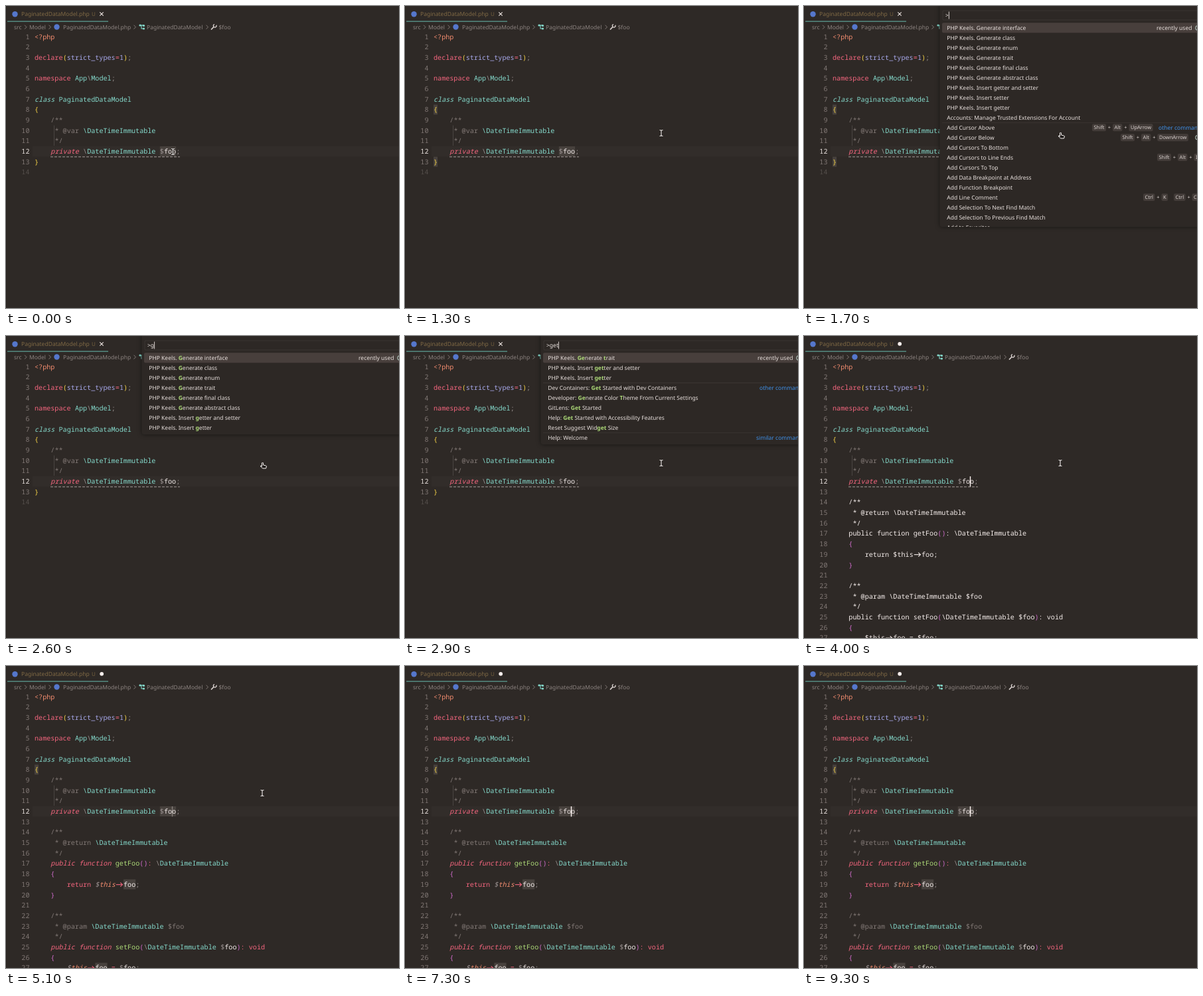
Write an HTML page with a canvas that moves like this. It is 592 px wide and 454 px high and loops after 9500 ms.

```html
<!DOCTYPE html>
<html lang="en">
<head>
<meta charset="utf-8">
<title>Generate getter and setter</title>
<style>
html, body { margin: 0; width: 100%; height: 100%; overflow: hidden; background: #2e2926; }
canvas { display: block; }
</style>
</head>
<body>
<canvas id="stage" width="592" height="454"></canvas>
<script>
const ctx = document.getElementById('stage').getContext('2d');
const W = 592, H = 454, LOOP = 9500, STEP = 100;
const UI = '"Noto Sans", "Open Sans", sans-serif';
const MONO = '"Noto Sans Mono", "DejaVu Sans Mono", monospace';
const CELL = 6.09, LEFT = 43, PITCH = 15.68;

// Colour codes used after "~" in code lines; capitals mean italic.
const INK = {
  w: '#f6eeec', g: '#827976', d: '#9a9190', c: '#85dacc', r: '#f5667f', o: '#f38d70',
  p: '#a8a9eb', n: '#adda78', y: '#f9d649', v: '#cf6bcb'
};

const HEAD = [
  '~o<?php', '', '~rdeclare~y(~pstrict_types~r=~p1~y)~d;', '',
  '~rnamespace ~cApp~d\\~cModel~d;', '',
  '~Cclass ~cPaginatedDataModel', '~y{',
  '~g    /**', '~g     * @var ~c\\DateTimeImmutable', '~g     */',
  '~R    private ~d\\~cDateTimeImmutable ~d$~wfoo~d;'
];
const BEFORE = [...HEAD, '~y}', ''];
const AFTER = [
  ...HEAD, '',
  '~g    /**', '~g     * @return ~c\\DateTimeImmutable', '~g     */',
  '~R    public function ~ngetFoo~v()~r: ~d\\~cDateTimeImmutable',
  '~v    {', '~r        return ~D$~Othis~r->~wfoo~d;', '~v    }', '',
  '~g    /**', '~g     * @param ~c\\DateTimeImmutable ~g$foo', '~g     */',
  '~R    public function ~nsetFoo~v(~d\\~cDateTimeImmutable ~d$~wfoo~v)~r: void',
  '~v    {', '~D        $~Othis~r->~wfoo ~r= ~d$~wfoo~d;'
];

const tool = s => 'PHP Keels. ' + s;
const other = 'other commands';
// Rows are [text, group label, label x, "x keys"]; asterisks enclose matches.
const COMMANDS = [
  ...['interface', 'class', 'enum', 'trait', 'final class', 'abstract class'].map(s => [tool('Generate ' + s)]),
  ...['getter and setter', 'setter', 'getter'].map(s => [tool('Insert ' + s)]),
  ['Accounts: Manage Trusted Extensions For Account'],
  ['Add Cursor Above', other, 534, '434 Shift+Alt+UpArrow'],
  ['Add Cursor Below', '', 0, '477 Shift+Alt+DownArrow'],
  ['Add Cursors To Bottom'],
  ['Add Cursors to Line Ends', '', 0, '532 Shift+Alt+I'],
  ['Add Cursors To Top'], ['Add Data Breakpoint at Address'], ['Add Function Breakpoint'],
  ['Add Line Comment', '', 0, '511 Ctrl+K Ctrl+C'],
  ['Add Selection To Next Find Match'], ['Add Selection To Previous Find Match'],
  ['Add to Favorites']
];
const GET_ROWS = [
  [tool('*Ge*nerate *t*rait')],
  [tool('Insert *get*ter and setter')],
  [tool('Insert *get*ter')],
  ['Dev Containers: *Get* Started with Dev Containers', other, 534],
  ['Developer: *Ge*nerate Color *T*heme From Current Settings'],
  ['GitLens: *Get* Started'],
  ['Help: *Get* Started with Accessibility Features'],
  ['Reset Suggest Wid*get* Size'],
  ['Help: Welcome', 'similar commands', 529]
];

function text(s, x, y, color, size = 8.5, family = UI, style = '') {
  ctx.font = `${style} ${size}px ${family}`;
  ctx.fillStyle = color;
  ctx.fillText(s, x, y);
  return ctx.measureText(s).width;
}

function box(x, y, w, h, color, r = 0) {
  ctx.fillStyle = color;
  ctx.beginPath();
  ctx.roundRect(x, y, w, h, r);
  ctx.fill();
}

function dot(x, y, r, color) {
  ctx.fillStyle = color;
  ctx.beginPath();
  ctx.arc(x, y, r, 0, 7);
  ctx.fill();
}

function stroke(points, color, width = 1) {
  ctx.strokeStyle = color;
  ctx.lineWidth = width;
  ctx.beginPath();
  for (let i = 0; i < points.length; i += 2) ctx.lineTo(points[i], points[i + 1]);
  ctx.stroke();
}

const lineY = n => 46 + (n - 1) * PITCH;
const colX = c => LEFT + c * CELL;

function mark(line, col, len) {
  box(colX(col), lineY(line) - 7.5, len * CELL, 15, '#47413d');
}

function arrow(x, y, color) {
  stroke([x + 1, y, x + 10.5, y], color, 1.1);
  stroke([x + 7.5, y - 3, x + 10.7, y, x + 7.5, y + 3], color, 1.1);
}

function codeLine(src, n, plain) {
  const base = lineY(n) + 3.6;
  let col = 0;
  for (const part of src.split('~').slice(1)) {
    const key = part[0].toLowerCase(), s = part.slice(1);
    const italic = part[0] !== key && !plain;
    const color = plain && key !== 'v' ? INK.w : INK[key];
    if (s === '->') arrow(colX(col), base - 3.2, color);
    else {
      const lead = s.length - s.trimStart().length;
      text(s.trim(), colX(col + lead), base, color, 10.15, MONO, (italic ? 'italic ' : '') + '500');
    }
    col += s.length;
  }
}

function chrome(dirty) {
  box(0, 0, 1, H, '#26211f');
  box(2, 22.5, 152, 1.2, '#5d9f93');
  dot(13.5, 12.2, 4.2, '#5577cc');
  text('PaginatedDataModel.php', 23, 15.3, '#806a45', 8.55);
  text('U', 129, 15.2, '#75613f', 8);
  if (dirty) dot(144.2, 11.8, 2.9, '#f6eeec');
  else {
    stroke([141.3, 9.3, 146.7, 14.7], '#eee6e3', 1.1);
    stroke([146.7, 9.3, 141.3, 14.7], '#eee6e3', 1.1);
  }
  const gray = '#8d8481', y = 34.7;
  text('src', 12, y, gray);
  text('Model', 35, y, gray);
  dot(76.5, 31.5, 4.2, '#5577cc');
  text('PaginatedDataModel.php', 86, y, gray);
  text('PaginatedDataModel', 212, y, gray);
  text('$foo', 320.5, y, gray);
  for (const x of [28, 64.5, 192.5, 301.5]) stroke([x, 28.7, x + 3, 31.7, x, 34.7], gray, .9);
  stroke([201, 29, 208, 29], INK.c, 1.3);
  stroke([204, 29, 204, 34, 208, 34], INK.c, 1.1);
  for (const [x, v] of [[202, 29], [207.5, 29.5], [207.5, 34]]) dot(x, v, 1.6, INK.c);
  stroke([309, 35.5, 313.3, 31], '#d8d0cd', 1.8);
  ctx.strokeStyle = '#d8d0cd';
  ctx.lineWidth = 1.3;
  ctx.beginPath();
  ctx.arc(314.7, 29.7, 2.3, -.4, 4.4);
  ctx.stroke();
}

// Opacity of the softly blinking caret.
function caretAlpha(t) {
  if (t < 500 || t >= 1700 && t < 4000) return 0;
  if (t >= 4000 && t < 4700) return 1;
  const phase = (t - (t < 4000 ? 1100 : 4700) + 2000) % 1000;
  return [.75, .3, 0, 0, .35, .8][phase / STEP] ?? 1;
}

function editor(t) {
  const done = t >= 4000, lines = done ? AFTER : BEFORE;
  const focused = t < 1800 || t >= 4300;
  chrome(done);
  if (!done || focused) box(40, lineY(12) - 7.8, W - 40, 15.6, '#322d2a');
  if (focused) {
    mark(12, 31, 4);
    if (done) {
      mark(19, 22, 3);
      mark(27, 15, 3);
    }
    if (t >= 500) {
      mark(8, 0, 1);
      if (!done) mark(13, 0, 1);
    }
  }
  box(72, lineY(10) - 7.5, 1, 2 * PITCH - 1, '#4a4441');
  lines.forEach((src, i) => {
    const n = i + 1, s = String(n);
    const color = n === 12 ? '#e8e0dd' : !done && n === 14 ? '#544e4b' : '#807774';
    text(s, 35.5 - s.length * CELL, lineY(n) + 3.6, color, 10.15, MONO);
    codeLine(src, n, n > 13 && t < 4200);
  });
  if (t < 4500) {
    ctx.setLineDash([4, 2]);
    stroke([67, 226.8, 262, 226.8], '#a39b97', 1);
    ctx.setLineDash([]);
  }
  ctx.globalAlpha = caretAlpha(t);
  box(249.8, 211, 1.4, 15.5, '#fff6f4');
  ctx.globalAlpha = 1;
}

function keyCaps(spec, y) {
  const [start, ...chords] = spec.split(' ');
  let x = +start;
  for (const chord of chords) {
    chord.split('+').forEach((key, i) => {
      if (i) {
        text('+', x + 2.8, y + 2.7, '#d8d0cd', 7.5);
        x += 10;
      }
      ctx.font = `7.5px ${UI}`;
      const w = ctx.measureText(key).width + 5;
      box(x, y - 5.5, w, 11, '#433c39', 2);
      text(key, x + 2.5, y + 2.7, '#d8d0cd', 7.5);
      x += w;
    });
    x += 9;
  }
}

function gear(y) {
  ctx.strokeStyle = '#a9bdb5';
  ctx.lineWidth = 1.1;
  ctx.beginPath();
  ctx.arc(593, y, 3.2, 0, 7);
  ctx.stroke();
}

function rowsFor(query) {
  if (!query) return COMMANDS;
  if (query === 'get') return GET_ROWS;
  const match = new RegExp('\\b' + query, 'i');
  return COMMANDS.filter(r => match.test(r[0])).map(r => [r[0].replace(match, '*$&*')]);
}

function palette(t) {
  const size = [2600, 2700, 2800, 3100, 3300, 3400].filter(k => t >= k).length;
  const query = 'getter'.slice(0, size), rows = rowsFor(query);
  const bottom = Math.min(332, 28 + 15 * rows.length);
  ctx.save();
  ctx.shadowColor = 'rgba(0,0,0,.5)';
  ctx.shadowBlur = 6;
  box(204.5, -6, W, bottom + 6, '#2d2825', 4);
  ctx.restore();
  box(208.5, 6.5, W, 15, '#3b3532', 2);
  box(209.5, 7.5, W, 13, '#2d2825', 1);
  const end = 213 + text('>' + query, 213, 17.2, '#eee6e3');
  if (t < 2300 || t >= 2600) box(end, 8.5, 1, 11, '#d8d0cd');

  ctx.save();
  ctx.beginPath();
  ctx.rect(205, 24, W, bottom - 24);
  ctx.clip();
  box(208, 25.3, W, 15, '#483f3c', 2);
  rows.forEach(([label, group, groupX, keys], i) => {
    const y = 33 + 14.97 * i;
    let x = 215.3;
    label.split('*').forEach((s, k) => {
      x += text(s, x, y + 3.1, k % 2 ? INK.n : '#e9e1de', 8.5, UI, k % 2 ? 'bold' : '');
    });
    if (group) {
      box(208, y - 7.8, W, .8, '#3c3633');
      text(group, groupX, y + 3.1, '#3f91ea');
    }
    if (keys) keyCaps(keys, y);
  });
  text('recently used', 531, 36.1, '#e9e1de');
  gear(33);
  if (!query) gear(33 + 14.97 * 11);
  ctx.restore();
}

function beam(x, y) {
  for (const [color, w] of [['#1c1816', 2.6], ['#fffaf8', 1.1]]) {
    stroke([x, y - 4, x, y + 4], color, w);
    stroke([x - 2.5, y - 4.5, x, y - 4, x + 2.5, y - 4.5], color, w);
    stroke([x - 2.5, y + 4.5, x, y + 4, x + 2.5, y + 4.5], color, w);
  }
}

function hand(x, y) {
  ctx.beginPath();
  [-2, -4, -1, -5, 0, -4, 0, -1, 4, 0, 5, 1, 4, 4, -1, 4, -4, 1, -4, 0, -2, 1]
    .forEach((v, i, a) => i % 2 || ctx.lineTo(x + v, y + a[i + 1]));
  ctx.closePath();
  ctx.fillStyle = '#1c1816';
  ctx.fill();
  ctx.strokeStyle = '#fffaf8';
  ctx.lineWidth = 1;
  ctx.lineJoin = 'round';
  ctx.stroke();
}

function pointer(t) {
  if (t >= 1700 && t < 2800) return hand(387.5, 195);
  if (t >= 6900) return;
  const come = Math.min(1, Math.max(0, (t - 400) / 300));
  const ease = 1 - (1 - come) ** 2;
  const leave = Math.max(0, (t - 6500) / 300);
  beam(251.5 + 134.5 * ease + 147 * leave, 219 - 28 * ease + 222 * leave ** 1.5);
}

function draw(now) {
  const t = Math.floor(now % LOOP / STEP) * STEP;
  ctx.textRendering = 'geometricPrecision';
  box(0, 0, W, H, '#2e2926');
  editor(t);
  if (t >= 1700 && t < 4000) palette(t);
  pointer(t);
}

let start;
function tick(now) {
  start ??= now;
  draw(now - start);
  requestAnimationFrame(tick);
}
requestAnimationFrame(tick);
</script>
</body>
</html>
```
